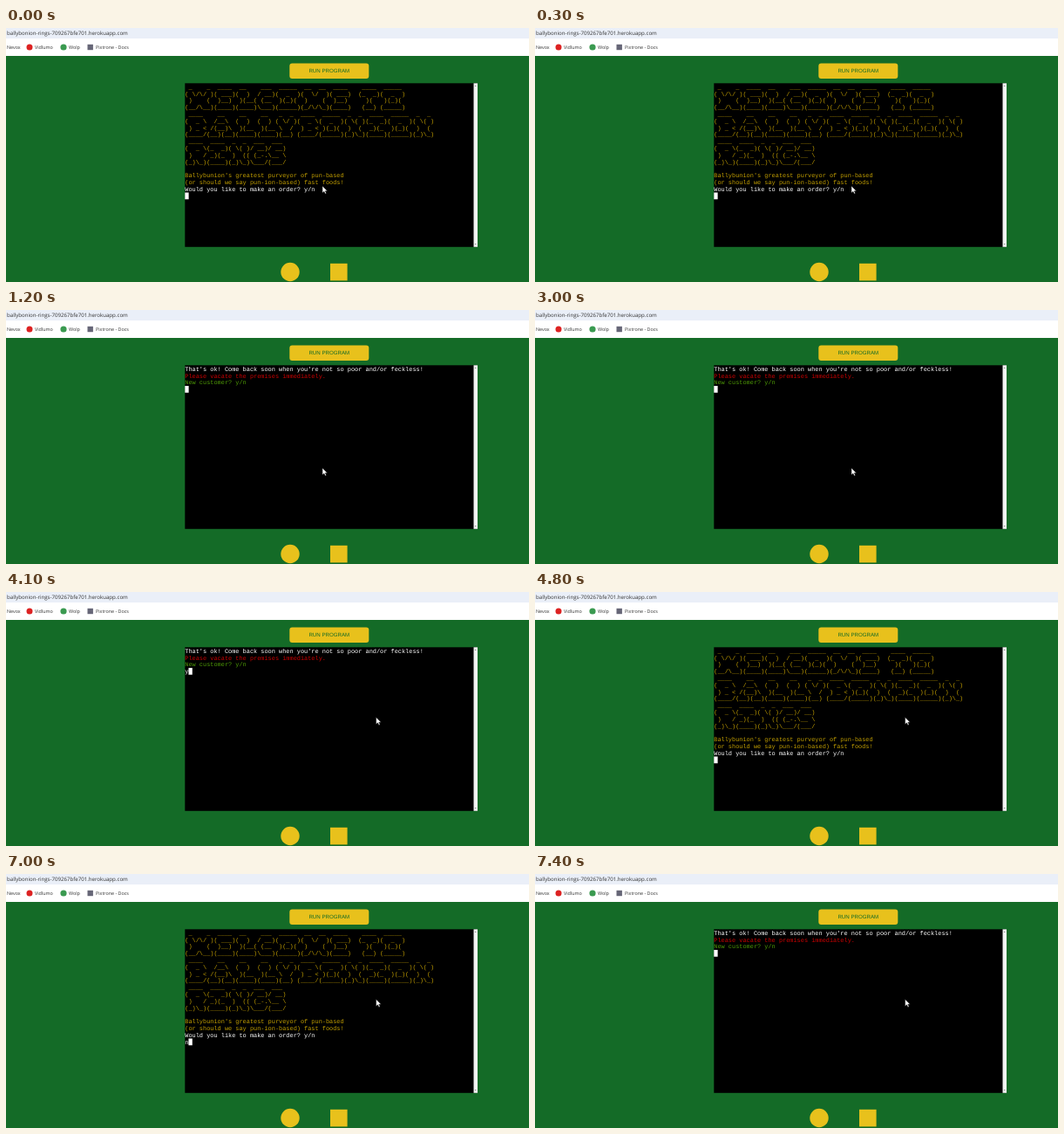
Write an HTML page that moves like this. It is 600 by 291 pixels and loops after 8 s.

```html
<!DOCTYPE html>
<html lang="en">
<head>
<meta charset="utf-8">
<style>
  html, body { margin: 0; height: 100%; overflow: hidden; }
  svg { display: block; width: 600px; height: 291px; }
  text { white-space: pre; text-rendering: geometricPrecision; }
  .bar { font: 5.4px "Open Sans", sans-serif; fill: #333; }
  .term { font: 6.915px "Liberation Mono", monospace; }
</style>
</head>
<body>
<svg viewBox="0 0 600 291">
  <rect width="600" height="291" fill="#146b27"/>
  <rect width="600" height="32" fill="#fff"/>
  <rect width="600" height="12" fill="#eaeff8"/>
  <g class="bar">
    <text x="1" y="7.6" style="font-size:6.12px">ballybonion-rings-709267bfe701.herokuapp.com</text>
    <text x="1" y="23.9">Nevox</text>
    <text x="33" y="23.9">Vidlumo</text>
    <text x="72" y="23.9">Wolp</text>
    <text x="103" y="23.9">Pixtrone - Docs</text>
  </g>
  <circle cx="27" cy="22" r="3.5" fill="#d22"/>
  <circle cx="66" cy="22" r="3.6" fill="#3a9a50"/>
  <rect x="93.5" y="18.8" width="6.4" height="6.4" fill="#667"/>

  <rect x="325.3" y="40.5" width="91" height="17.5" rx="3" fill="#e8c11c"/>
  <text x="370.8" y="51.4" text-anchor="middle" fill="#146b27" font-family="Liberation Sans, sans-serif" font-size="6.15">RUN PROGRAM</text>

  <rect x="205.3" y="63.3" width="335.7" height="187.5"/>
  <rect x="536.5" y="63.3" width="4.5" height="187.5" fill="#f4f4f4"/>
  <path d="M537.7 67l1-1.4 1 1.4zM537.7 247l1 1.4 1-1.4z" fill="#888"/>
  <g class="term" id="term"></g>
  <rect id="caret" width="4.3" height="7.8" fill="#fff"/>

  <circle cx="326" cy="279.5" r="10.7" fill="#e8c11c"/>
  <rect x="372" y="269.8" width="19.6" height="19.6" fill="#e8c11c"/>
  <path id="mouse" d="M0 0v8l1.9-1.8 1.3 2.7 1.3-.6-1.3-2.6h2.5z" fill="#fff" stroke="#000" stroke-width=".4"/>
</svg>
<script>
const NS = 'http://www.w3.org/2000/svg';
const CELL_W = 4.15, CELL_H = 7.81, LEFT = 205.3, TOP = 63.5;
const GOLD = '#c4a000', RED = '#cc0000', GREEN = '#4e9a06', WHITE = '#fff';
const $ = id => document.getElementById(id);

const banner = String.raw`
 _    _  ____  __    ___  _____  __  __  ____    ____  _____
( \/\/ )( ___)(  )  / __)(  _  )(  \/  )( ___)  (_  _)(  _  )
 )    (  )__)  )(__( (__  )(_)(  )    (  )__)     )(   )(_)(
(__/\__)(____)(____)\___)(_____)(_/\/\_)(____)   (__) (_____)
 ____    __    __    __   _  _  ____  _____  _  _  ____  _____  _  _
(  _ \  /__\  (  )  (  ) ( \/ )(  _ \(  _  )( \( )(_  _)(  _  )( \( )
 ) _ < /(__)\  )(__  )(__ \  /  ) _ < )(_)(  )  (  _)(_  )(_)(  )  (
(____/(__)(__)(____)(____)(__) (____/(_____)(_)\_)(____)(_____)(_)\_)
 ____  ____  _  _  ___  ___
(  _ \(_  _)( \( )/ __)/ __)
 )   / _)(_  )  (( (_-.\__ \
(_)\_)(____)(_)\_)\___/(___/

Ballybunion's greatest purveyor of pun-based
(or should we say pun-ion-based) fast foods!`.slice(1).split('\n');

const welcome = [...banner.map(s => [s, GOLD]), ['Would you like to make an order? y/n', WHITE]];
const goodbye = [
  ["That's ok! Come back soon when you're not so poor and/or feckless!", WHITE],
  ['Please vacate the premises immediately.', RED],
  ['New customer? y/n', GREEN]
];

// start time, screen, typed answer
const steps = [
  [0, welcome, ''], [1000, welcome, 'n'], [1200, goodbye, ''], [3600, goodbye, 'y'],
  [4800, welcome, ''], [7000, welcome, 'n'], [7400, goodbye, '']
];
// start time, pointer position
const moves = [[0, 363, 181], [4000, 394, 162], [4100, 424.6, 143.6]];

const current = (list, t) => list.filter(e => e[0] <= t).pop();

function place(el, x, y) {
  el.setAttribute('x', x);
  el.setAttribute('y', y);
}

function addLine([str, color], row) {
  const el = document.createElementNS(NS, 'text');
  place(el, LEFT, TOP + row * CELL_H + 6.3);
  el.setAttribute('fill', color);
  el.textContent = str;
  $('term').append(el);
}

let shown;
function draw(now) {
  const t = now % 8000;
  const step = current(steps, t);
  if (step !== shown) {
    const [, lines, typed] = shown = step;
    $('term').replaceChildren();
    [...lines, [typed, WHITE]].forEach(addLine);
    place($('caret'), LEFT + typed.length * CELL_W, TOP + lines.length * CELL_H);
  }
  const [, x, y] = current(moves, t);
  $('mouse').setAttribute('transform', `translate(${x} ${y})`);
  requestAnimationFrame(() => draw(performance.now()));
}
draw(0);
</script>
</body>
</html>
```
